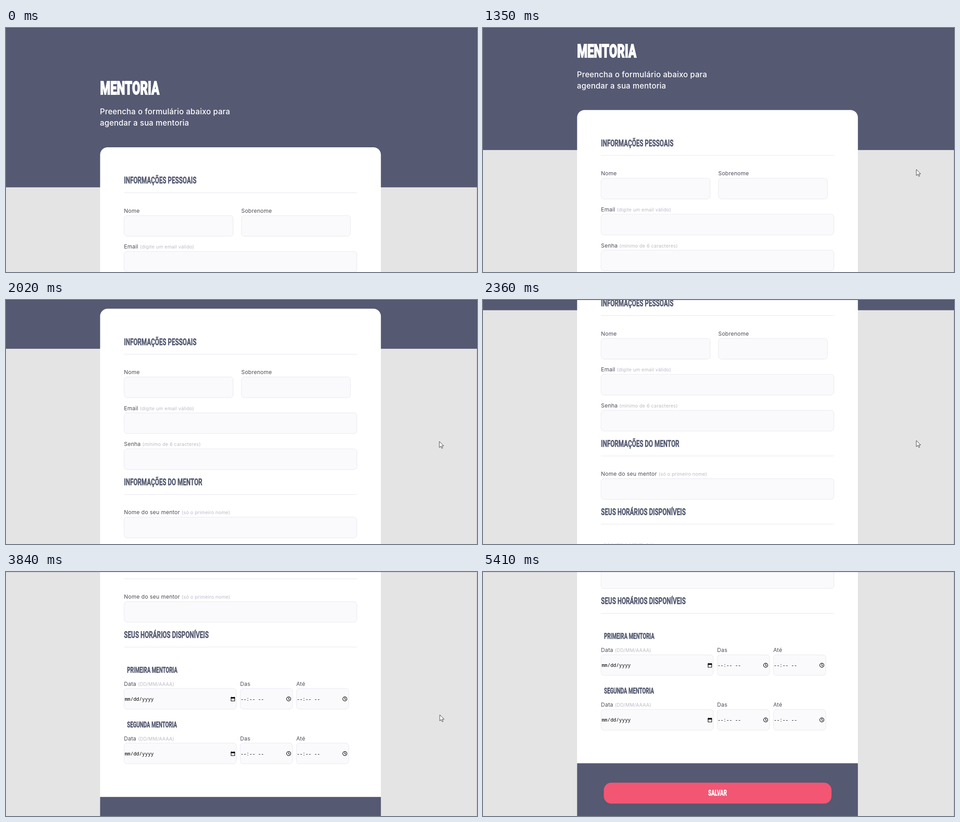
An HTML page for the animation above (6070 ms loop, 1038 by 540 pixels).

```html
<!DOCTYPE html>
<html lang="pt-BR">
<head>
<meta charset="utf-8">
<title>Mentoria</title>
<style>
  html, body { margin: 0; width: 100%; height: 100%; overflow: hidden; background: #e4e4e4; }
  svg { display: block; width: 1038px; height: 540px; }
  text { font-family: Inter, sans-serif; letter-spacing: .02em; white-space: pre; }
  .title { font-family: Roboto, sans-serif; font-weight: 700; letter-spacing: 0; fill: #535870;
    stroke: #535870; stroke-width: .45; vector-effect: non-scaling-stroke; }
  .white { fill: #fff; stroke: #fff; }
  .main { font-weight: 900; stroke-width: 1.5; }
  .label { font-size: 12px; fill: #4e4958; }
  .hint { font-size: 10.4px; fill: #bdb8c9; }
  .lead { font-size: 17px; font-weight: 500; letter-spacing: .014em; fill: #fff; }
  .mono { font: 10.7px "Noto Sans Mono", monospace; letter-spacing: 0; fill: #000; }
  .field { fill: #fafafc; stroke: #e6e6f0; stroke-width: .9; }
  .rule { stroke: #e6e6f0; }
  .icon { fill: none; stroke: #000; stroke-width: 1.2; }
</style>
</head>
<body>
<svg viewBox="0 0 1038 540">
  <rect width="1038" height="540" fill="#e4e4e4"/>
  <g id="page"></g>
  <path d="M0 .5H1037.5V540" fill="none" stroke="#000" stroke-opacity=".13"/>
  <path id="cursor" d="M0 0V13.5L3.2 10.6 5.4 15.4 7.4 14.5 5.3 9.9H9.6Z" fill="#fff" stroke="#111" stroke-width=".8"/>
</svg>
<script>
const INK = '#555972';
const page = document.getElementById('page');
const cursor = document.getElementById('cursor');

const rect = (x, y, w, h, fill, r = 0) =>
  `<rect x="${x}" y="${y}" width="${w}" height="${h}" rx="${r}" fill="${fill}"/>`;
const text = (cls, x, y, content) => `<text class="${cls}" x="${x}" y="${y}">${content}</text>`;

// Headings imitate a condensed display face with one common scale.
const title = (x, y, size, content, cls = '', anchor = 'start') =>
  `<text class="title ${cls}" transform="translate(${x} ${y}) scale(.64 1)" font-size="${size}" text-anchor="${anchor}">${content}</text>`;

const section = (y, content) =>
  title(260, y, 21, content) + `<path class="rule" d="M260 ${y + 20.2}H773.5"/>`;

const field = (x, y, w, label, hint = '') =>
  text('label', x, y, label + (hint && ` <tspan class="hint">(${hint})</tspan>`)) +
  `<rect class="field" x="${x + .3}" y="${y + 6.2}" width="${w}" height="45.8" rx="6.6"/>`;

const timeField = (x, y, label) =>
  field(x, y, 115.3, label) + text('mono', x + 1, y + 33, '--:-- --') +
  `<g class="icon" transform="translate(${x + 107} ${y + 29.3})"><circle r="4.5"/><path d="M0-2.8V.3L2 1.6"/></g>`;

const slot = (y, name) =>
  title(266.8, y, 17.5, name) +
  field(260, y + 29, 247.3, 'Data', 'DD/MM/AAAA') +
  text('mono', 261.4, y + 62.3, 'mm/dd/yyyy') +
  `<g transform="translate(495.5 ${y + 53.6})"><path class="icon" d="M.6 1.6H8.4V9.4H.6Z"/><path d="M0 1H9V3.8H0ZM1.4 0H2.6V2H1.4ZM6.4 0H7.6V2H6.4Z"/></g>` +
  timeField(516, y + 29, 'Das') + timeField(639.8, y + 29, 'Até');

page.innerHTML = [
  rect(0, 0, 1038, 352.6, INK),
  title(207.4, 147, 40.2, 'MENTORIA', 'white main'),
  text('lead', 207, 191.2, 'Preencha o formulário abaixo para'),
  text('lead', 207, 216, 'agendar a sua mentoria'),
  rect(207.4, 264, 618.8, 920, '#fff', 16.5),
  section(344.4, 'INFORMAÇÕES PESSOAIS'),
  field(260, 408.8, 240.3, 'Nome'),
  field(518.5, 408.8, 240.3, 'Sobrenome'),
  field(260, 488.3, 513, 'Email', 'digite um email válido'),
  field(260, 568, 513, 'Senha', 'mínimo de 6 caracteres'),
  section(654.9, 'INFORMAÇÕES DO MENTOR'),
  field(260, 719.1, 513, 'Nome do seu mentor', 'só o primeiro nome'),
  section(805.8, 'SEUS HORÁRIOS DISPONÍVEIS'),
  slot(882.5, 'PRIMEIRA MENTORIA'),
  slot(1003.5, 'SEGUNDA MENTORIA'),
  rect(207.4, 1157.8, 618.8, 120, INK),
  rect(266.2, 1200.8, 501.8, 46.3, '#f25673', 16.5),
  title(516.8, 1229.8, 17.5, 'SALVAR', 'white', 'middle')
].join('');

const LOOP = 6070, STEP = LOOP / 90;
const WHEEL = 82.5, WHEEL_MS = 195, MAX_SCROLL = 734.5;
const wheelStarts = [1116, 1575, 1850, 2130, 2740, 2923, 3200, 3375, 4140];

const clamp = v => Math.min(1, Math.max(0, v));
const smooth = v => v * v * (3 - 2 * v);

function scrollAt(t) {
  return wheelStarts.reduce((y, start) =>
    y + Math.min(WHEEL, MAX_SCROLL - y) * smooth(clamp((t - start) / WHEEL_MS)), 0);
}

function cursorAt(n) {
  if (n < 8) {
    const left = 1 - n / 8;
    return [955 + 32 * left, 313 + 290 * left * left];
  }
  if (n < 57) return [955, n >= 34 && n < 41 ? 311 : 313];
  const p = clamp((n - 67) / 13);
  return [956 + 64 * p, 316 + 229 * p * p];
}

// The motion advances in 90 equal steps per loop, like a screen recording.
function draw(now) {
  const n = Math.floor(now % LOOP / STEP + .2) % 90;
  page.setAttribute('transform', `translate(0 ${-scrollAt(n * STEP)})`);
  cursor.setAttribute('transform', `translate(${cursorAt(n)})`);
  requestAnimationFrame(draw);
}
draw(performance.now());
</script>
</body>
</html>
```
